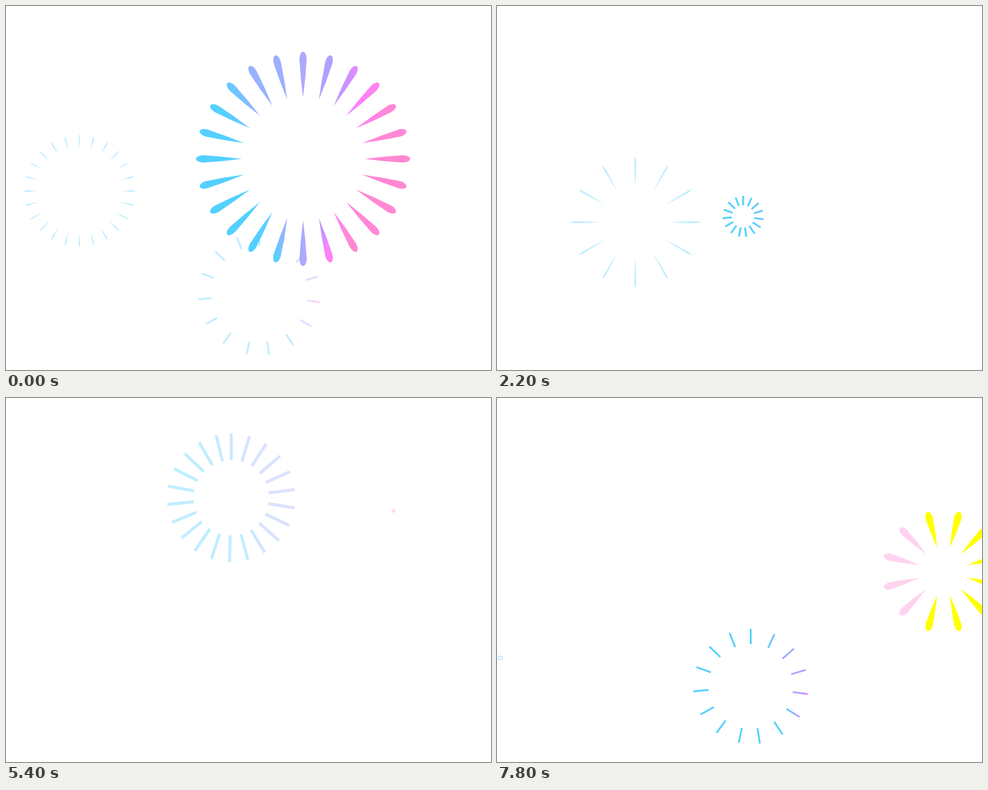
Animation of 800 by 600 pixels, one loop 8000 ms. Source, as an HTML page with a canvas:

```html
<!DOCTYPE html>
<html lang="en">
<head>
<meta charset="utf-8">
<title>Fireworks</title>
<style>
  html, body { margin: 0; width: 100%; height: 100%; overflow: hidden; background: #fff; }
  canvas { display: block; }
</style>
</head>
<body>
<canvas id="stage" width="800" height="600"></canvas>
<script>
const LOOP = 8000, STEP = 200, TAU = Math.PI * 2;
const ctx = document.getElementById('stage').getContext('2d');

// Hues fan out around a point below the stage centre: [degrees from vertical, colour].
const HUES = [
  [-180, '#54d0ff'], [-19, '#54d0ff'], [-15, '#72c4ff'], [-12, '#94b2ff'], [-6, '#9cb0ff'],
  [0, '#b0a8ff'], [5, '#b0a0ff'], [9, '#cc92ff'], [12, '#ff80ff'], [20, '#ff88d4'], [180, '#ff88d4']
];

function colourField(alpha) {
  const field = document.createElement('canvas');
  field.width = 800;
  field.height = 600;
  const c = field.getContext('2d');
  const fan = c.createConicGradient(Math.PI / 2, 495, 560);
  for (const [deg, colour] of HUES) fan.addColorStop(0.5 + deg / 360, colour);
  c.fillStyle = '#fff';
  c.fillRect(0, 0, 800, 600);
  c.globalAlpha = alpha;
  c.fillStyle = fan;
  c.fillRect(0, 0, 800, 600);
  c.globalAlpha = 1;
  c.fillStyle = '#ff0';
  c.fillRect(706, 0, 94, 600);
  return ctx.createPattern(field, 'no-repeat');
}
const VIVID = colourField(1), PALE = colourField(0.37);

const easeOut = p => 1 - (1 - p) ** 2;

// Straight strokes: the head eases out while the tail follows at constant speed.
function rays(x, y, radius, start, life, paint, { n = 15, turn = 24.4, jog = 3.2, width = 3 } = {}) {
  return t => {
    const p = (t - start) / life;
    if (t < start - 200 || p > 1.16) return;
    ctx.fillStyle = paint;
    ctx.beginPath();
    if (p <= 0) {
      ctx.arc(x, y, 3, 0, TAU);
    } else {
      const q = Math.min(p, 1);
      let head = radius * easeOut(q), tail = radius * q;
      if (q > 0.95) {
        const mid = (head + tail) / 2 + radius * 0.1 * (p - q);
        const half = Math.max((head - tail) / 2, 2.5);
        head = mid + half;
        tail = mid - half;
      }
      for (let i = 0; i < n; i++) {
        const deg = i * turn - (i > n / 2 ? jog : 0);
        ctx.setTransform(1, 0, 0, 1, x, y);
        ctx.rotate(deg * TAU / 360);
        ctx.rect(-width / 2, -head, width, head - tail);
      }
      ctx.resetTransform();
    }
    ctx.fill();
  };
}

// Teardrops that stretch outwards, then grow thin.
function drops(x, y, radius, start, life, paint, { n = 24, offset = 0, pull = 1 } = {}) {
  return t => {
    const p = (t - start) / life;
    if (p <= 0 || p >= 1) return;
    const w = 6 * Math.min(1, (1 - p) / 0.5) ** 2;
    const head = Math.max(radius * easeOut(p), 10);
    const tail = radius * pull * (1.238 * p - 0.77 * p * p);
    const length = head - tail;
    const cap = Math.min(length / 2, 6 + length * 0.08);
    const neck = cap - head;
    ctx.beginPath();
    for (let i = 0; i < n; i++) {
      ctx.setTransform(1, 0, 0, 1, x, y);
      ctx.rotate(offset + i * TAU / n);
      ctx.moveTo(0, -tail);
      ctx.quadraticCurveTo(-w * 0.7, (neck - tail) / 2, -w, neck);
      ctx.ellipse(0, neck, w, cap, 0, Math.PI, TAU);
      ctx.quadraticCurveTo(w * 0.7, (neck - tail) / 2, 0, -tail);
    }
    ctx.resetTransform();
    ctx.fillStyle = paint;
    ctx.fill();
  };
}

const bursts = [
  rays(418, 475, 109, -1241, 1700, PALE),
  drops(121, 305, 95, -1435, 1650, VIVID, { pull: 1.49 }),
  drops(490, 252, 242, -1285, 2677, VIVID),
  drops(228, 356.5, 115, 963, 1650, PALE, { n: 12 }),
  rays(406, 347, 109, 1919, 1653, VIVID),
  drops(228, 356.5, 182, 2323, 2677, PALE),
  rays(371.5, 164.5, 209, 4775, 2100, PALE, { n: 22, turn: 16.5, jog: 0, width: 5 }),
  rays(639.5, 186, 109, 5585, 1653, PALE),
  rays(418.5, 475.5, 109, 6742, 1653, VIVID),
  drops(736.5, 286, 200, 6755, 3500, VIVID.constructor && PALE, { n: 12, offset: TAU / 24, pull: 0.68 }),
  rays(5.5, 428.5, 109, 7770, 1653, PALE)
];

const origin = performance.now();
function frame() {
  const elapsed = Math.max(0, performance.now() - origin) % LOOP;
  const t = Math.floor(elapsed / STEP) * STEP;
  ctx.clearRect(0, 0, 800, 600);
  for (const draw of bursts) draw(t);
  requestAnimationFrame(frame);
}
frame();
</script>
</body>
</html>
```
